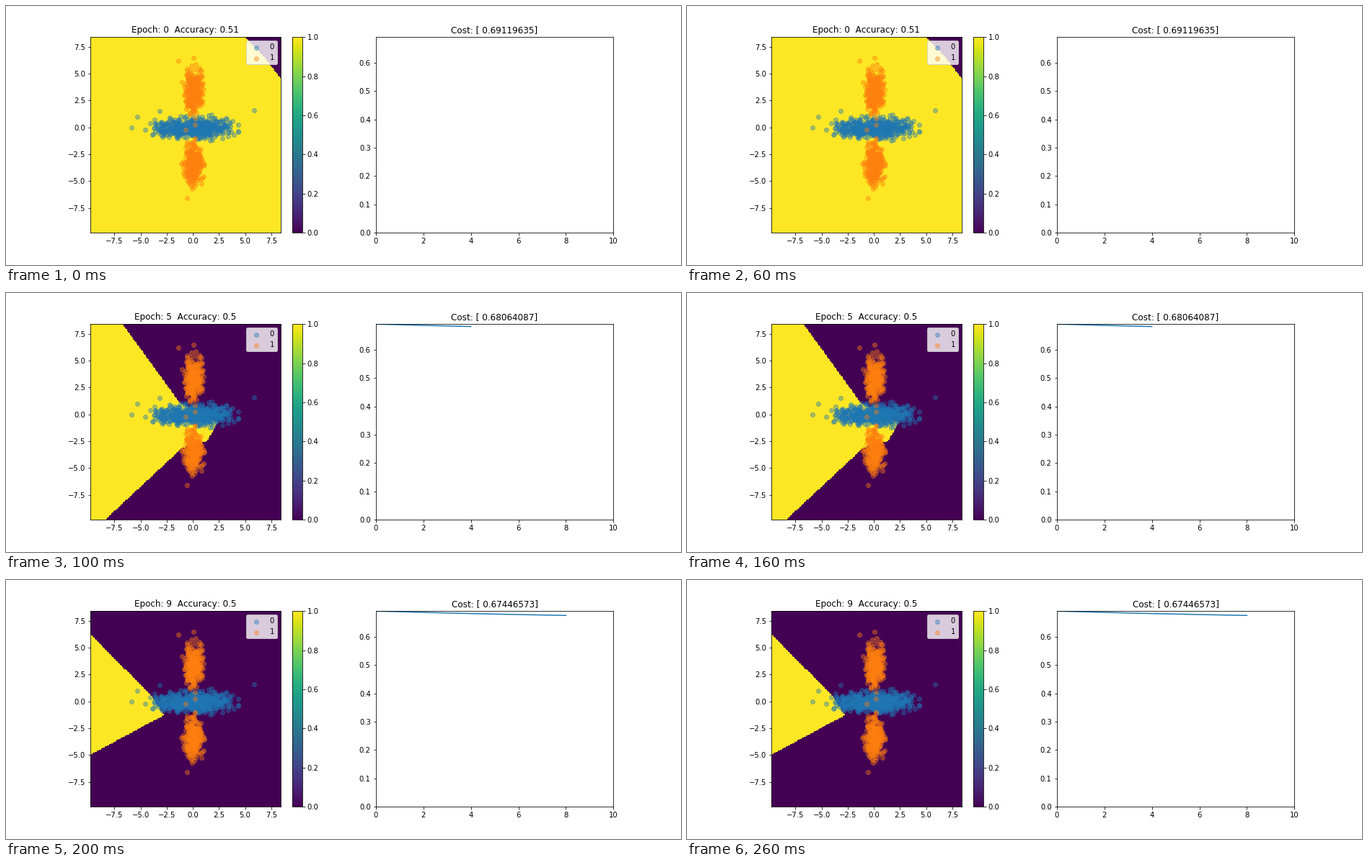
A matplotlib script for the animation above (300 ms loop, 936 px wide and 360 px high).

```python
import numpy as np
import matplotlib.pyplot as plt
from matplotlib.animation import FuncAnimation
from matplotlib.path import Path

plt.rcParams.update({"font.family": "DejaVu Sans", "font.size": 10,
                     "text.kerning_factor": 6})
rng = np.random.default_rng(7)
LO, HI, STEP = -9.8, 8.4, 0.1


def cluster(mean, std, n=245, cut=2.6):
    """Gaussian blob without its far tail."""
    z = rng.normal(size=(2 * n, 2))
    return mean + z[np.hypot(*z.T) < cut][:n] * std


# Two blobs per class, plus the few far points that stand out
class0 = np.vstack([cluster((-1.4, 0), (1.25, 0.47)),
                    cluster((1.4, 0), (1.25, 0.47)),
                    [(-5.9, 0), (-5.3, 0.95), (-3.2, 1.5), (5.85, 1.55)]])
class1 = np.vstack([cluster((0.05, 3.4), (0.46, 1.0)),
                    cluster((0.05, -3.5), (0.46, 1.0)),
                    [(0.07, 6.45), (-1.38, 6.2), (-0.55, -6.6),
                     (0.2, 0.25), (-0.7, -0.25)]])

# Corners of the area predicted as class 1 at each stage
regions = [
    [(LO, LO), (LO, HI), (4.9, HI), (6.85, 6.5), (HI, 4.53), (HI, LO)],
    [(LO, LO), (LO, HI), (-6.76, HI), (-1.24, 1.05), (2.35, -0.75),
     (1.4, -2.5), (-1.04, -3.15), (-8.4, LO)],
    [(LO, 6.2), (-3.93, 0.51), (-2.76, -1.3), (LO, -4.98)],
]
axis = np.arange(LO + STEP / 2, HI, STEP)
gx, gy = np.meshgrid(axis, axis)
cells = np.column_stack([gx.ravel(), gy.ravel()])
masks = [Path(r).contains_points(cells).reshape(gx.shape).astype(float)
         for r in regions]

epochs = np.arange(9)
costs = 0.69119635 - 0.002426 * epochs + 0.000063 * epochs ** 2
stages = [(0, "0.51", "0.69119635"),
          (5, "0.5", "0.68064087"),
          (9, "0.5", "0.67446573")]

fig, (left, right) = plt.subplots(1, 2, figsize=(13, 5), dpi=72)
fig.subplots_adjust(left=0.125, right=0.9, bottom=0.125, top=0.88, wspace=0.2)

field = left.imshow(masks[0], cmap="viridis", vmin=0, vmax=1, origin="lower",
                    extent=(LO, HI, LO, HI), aspect="auto",
                    interpolation="nearest")
fig.colorbar(field, ax=left, ticks=np.linspace(0, 1, 6))
for label, pts in enumerate((class0, class1)):
    left.scatter(*pts.T, color=f"C{label}", alpha=0.4, label=str(label))
left.set(xlim=(LO, HI), ylim=(LO, HI),
         xticks=np.arange(-7.5, 8, 2.5), yticks=np.arange(-7.5, 8, 2.5))
left.legend(loc="upper right")

line, = right.plot([], [])
right.set(xlim=(0, 10), ylim=(0, costs[0]),
          xticks=range(0, 11, 2), yticks=np.arange(7) / 10)


def update(i):
    epoch, accuracy, cost = stages[i]
    field.set_data(masks[i])
    line.set_data(epochs[:epoch], costs[:epoch])
    left.set_title(f"Epoch: {epoch}  Accuracy: {accuracy}")
    right.set_title(f"Cost: [ {cost}]")
    return field, line


anim = FuncAnimation(fig, update, frames=len(stages), interval=100, repeat=True)
plt.show()
```
